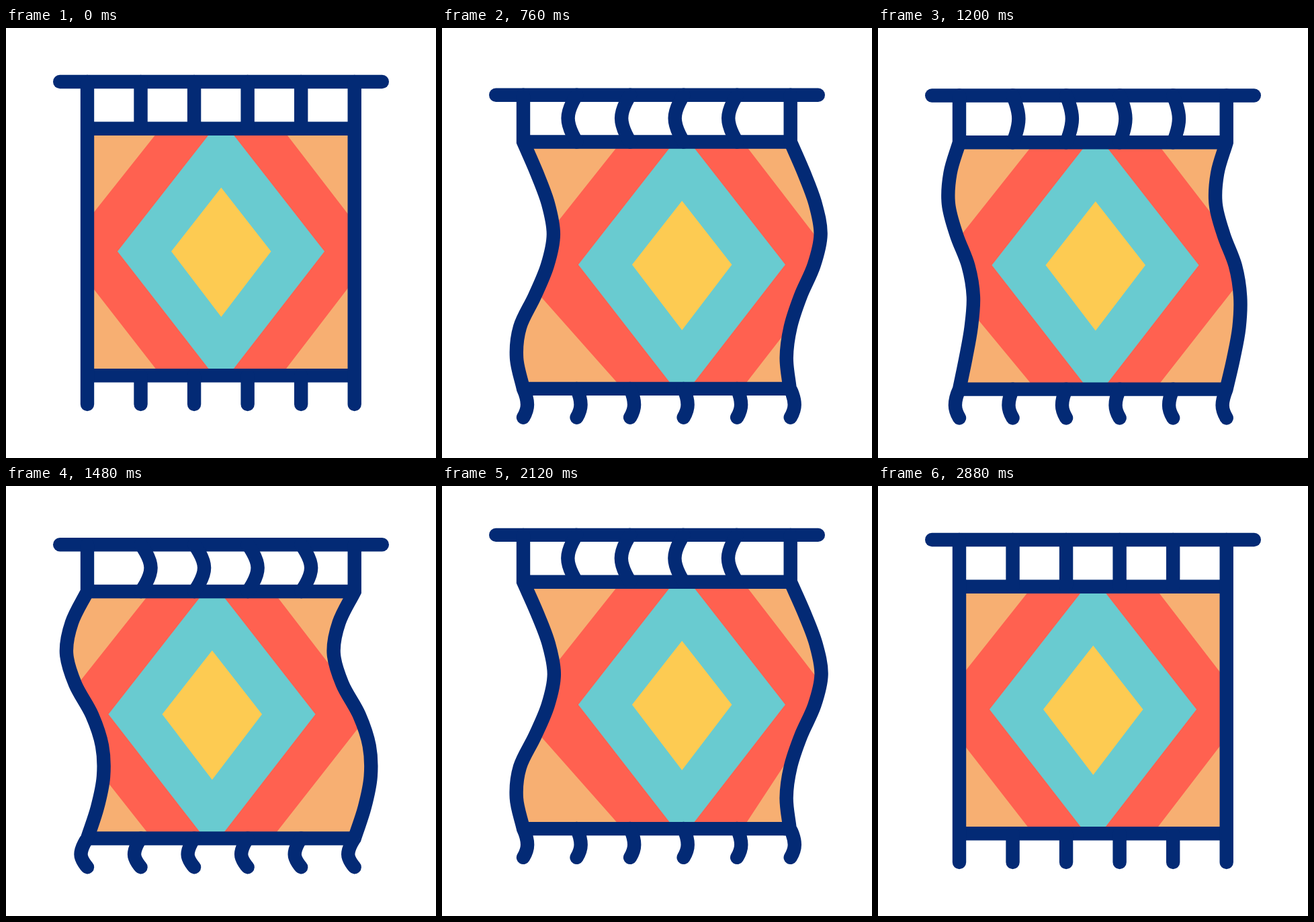
Write an HTML page that moves like this. It is 640 px wide and 640 px high and loops after 3000 ms.

```html
<!DOCTYPE html>
<html lang="en">
<head>
<meta charset="utf-8">
<title>Woven wall hanging</title>
<style>
html, body { margin: 0; width: 100%; height: 100%; overflow: hidden; background: #fff; }
svg { display: block; width: 100vw; height: 100vh; }
</style>
</head>
<body>
<svg viewBox="0 0 640 640">
  <defs><clipPath id="clip"><path id="cloth"/></clipPath></defs>
  <g id="all">
    <g clip-path="url(#clip)">
      <rect x="0" y="140" width="640" height="390" fill="#ff6150"/>
      <path id="corners" fill="#f7af72"/>
      <g id="diamonds">
        <path fill="#69cbd0" d="M320.2 135.5L474 332.5 320.2 531 166 332.5Z"/>
        <path fill="#fdcb52" d="M320.3 237.5L394.5 332.5 320.3 430 246 332.5Z"/>
      </g>
    </g>
    <g fill="none" stroke="#032a75" stroke-width="20.4">
      <path d="M80.2 80H559.8" stroke-linecap="round"/>
      <path d="M121 149.8H518.7M121 517.2H518.7"/>
      <path id="cords" stroke-linecap="round"/>
      <path id="sides" stroke-linecap="round"/>
    </g>
  </g>
</svg>
<script>
const $ = id => document.getElementById(id);
const LEFT = 121, RIGHT = 518.7, GAP = (RIGHT - LEFT) / 5;
const TOP = 149.8, BOTTOM = 517.2;

// Sideways offsets of the cloth edge, evenly spaced from top to bottom
const SWAY_L = [0, 20, 37, 45, 36, 17, -5, -10, 0];
const SWAY_R = [0, 20, 37, 45, 35, 15, 0, -6, -1];
const SWING = [0, -23, -31, -18, 7, 22, 24, 15, 0];

// Key values: [step, value]
const LIFT = [[0, 0], [23.3, 24], [46, -8], [70, 0]];
const SHIFT = [[0, 0], [17.5, 37], [28, 3.5], [35, -13.5], [45, 25], [51.5, 37], [58, 25], [70, 0]];
const RIGHTWARD = [[0, 0], [17.5, 1], [28, .22], [33.5, 0], [35, 0], [45, .61], [51.2, 1.02], [58, .59], [70, 0]];
const LEFTWARD = [[0, 0], [17.5, 0], [28, .78], [33.5, 1.02], [35, 1], [45, .39], [51.2, 0], [70, 0]];
const SLOPE_L = [[0, 1.286], [17.5, 1.127], [28, 1.208], [35, 1.268], [45, 1.16], [51, 1.13], [58, 1.189], [70, 1.286]];
const SLOPE_R = [[0, 1.304], [17.5, 1.286], [28, 1.275], [35, 1.275], [45, 1.49], [51, 1.52], [58, 1.49], [70, 1.304]];

// Monotone cubic through the keys, flat at every extreme
function ease(keys, s) {
  let k = 0;
  while (k < keys.length - 2 && s > keys[k + 1][0]) k++;
  const rate = j => (keys[j + 1][1] - keys[j][1]) / (keys[j + 1][0] - keys[j][0]);
  const tangent = j => {
    if (j === 0 || j === keys.length - 1) return 0;
    const a = rate(j - 1), b = rate(j);
    return a * b <= 0 ? 0 : 2 * a * b / (a + b);
  };
  const [x0, y0] = keys[k], [x1, y1] = keys[k + 1];
  const h = x1 - x0, u = (s - x0) / h, v = 1 - u;
  return y0 * v * v * (1 + 2 * u) + y1 * u * u * (3 - 2 * u)
    + h * u * v * (v * tangent(k) - u * tangent(k + 1));
}

const pt = (x, y) => x.toFixed(2) + ' ' + y.toFixed(2);

// Bézier segments of one cloth edge, from the upper hem down or back up
function edge(x, offsets, up) {
  const n = offsets.length - 1, h = (BOTTOM - TOP) / n;
  const slope = i => {
    const a = Math.max(0, i - 1), b = Math.min(n, i + 1);
    return (offsets[b] - offsets[a]) / (b - a) / 3;
  };
  const at = (i, side) => pt(x + offsets[i] + side * slope(i), TOP + h * (i + side / 3));
  let d = '';
  for (let k = 0; k < n; k++) {
    const a = up ? n - k : k, b = up ? a - 1 : a + 1, dir = b - a;
    d += `C${at(a, dir)} ${at(b, -dir)} ${at(b, 0)}`;
  }
  return d;
}

// A cord bent sideways by d between two heights
function bend(x, d, y0, mid, y1) {
  return `C${pt(x, y0)} ${pt(x + d, y0 + (mid - y0) * .55)} ${pt(x + d, mid)}`
    + `C${pt(x + d, mid + (y1 - mid) * .45)} ${pt(x, y1)} ${pt(x, y1)}`;
}

function corner(x, y, sx, sy, slope) {
  return `M${pt(x, y)}L${pt(x + sx * 200, y - sy * 200 * slope)} `
    + `${pt(x + sx * 400, y + sy * 20)} ${pt(x, y + sy * 20)}Z`;
}

function draw(s) {
  const r = ease(RIGHTWARD, s), l = ease(LEFTWARD, s), dx = ease(SHIFT, s);
  const mix = sway => sway.map((v, i) => v * r + SWING[i] * l);
  const offL = mix(SWAY_L), offR = mix(SWAY_R);
  const hang = -13 * r + 15 * l, fringe = 6 * r - 9.5 * l;

  $('all').setAttribute('transform', `translate(0 ${ease(LIFT, s).toFixed(2)})`);
  $('diamonds').setAttribute('transform', `translate(${dx.toFixed(2)} 0)`);

  $('cloth').setAttribute('d', `M${pt(LEFT, TOP)}${edge(LEFT, offL)}`
    + `L${pt(RIGHT + offR[8], BOTTOM)}${edge(RIGHT, offR, true)}Z`);

  $('corners').setAttribute('d',
    corner(221.5 + dx, 160, -1, -1, 1.26) + corner(419 + dx, 160, 1, -1, 1.3)
    + corner(222.7 + dx, 507, -1, 1, ease(SLOPE_L, s))
    + corner(417 + dx, 507, 1, 1, ease(SLOPE_R, s)));

  let cords = '';
  for (let i = 1; i < 5; i++) {
    const x = LEFT + i * GAP;
    cords += `M${pt(x, 80)}${bend(x, hang, 80, 114.5, TOP)}`
      + `M${pt(x, BOTTOM)}${bend(x, fringe, BOTTOM, 541, 560)}`;
  }
  $('cords').setAttribute('d', cords);

  const side = (x, off) => `M${pt(x, 80)}L${pt(x, TOP)}${edge(x, off)}`
    + bend(x, fringe, BOTTOM, 541, 560);
  $('sides').setAttribute('d', side(LEFT, offL) + side(RIGHT, offR));
}

// 70 steps of 40 ms, with a longer hold at both ends of the loop
const start = performance.now();
function tick() {
  const t = (performance.now() - start) % 3000;
  draw(Math.max(0, Math.min(70, Math.floor((t - 80) / 40))));
  requestAnimationFrame(tick);
}
tick();
</script>
</body>
</html>
```
